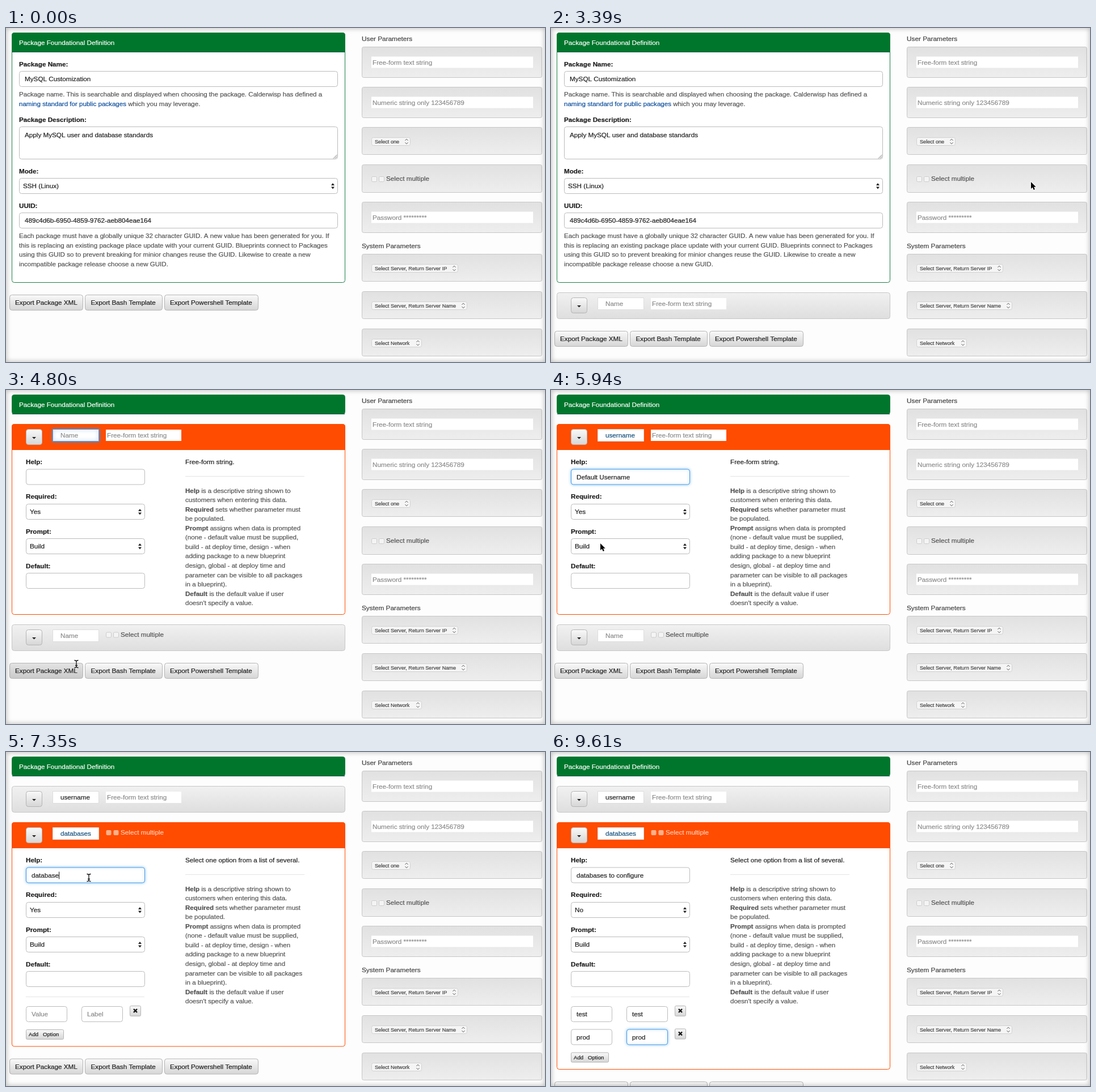
An HTML page with a canvas that plays this animation: 950 px wide and 590 px high, repeating every 9.71 s.

```html
<!DOCTYPE html>
<html lang="en">
<head>
<meta charset="utf-8">
<title>Package builder</title>
<style>
  html, body { margin: 0; width: 100%; height: 100%; overflow: hidden; background: #fdfdfd; }
  canvas { display: block; width: 100vw; height: 100vh; }
</style>
</head>
<body>
<canvas id="stage" width="950" height="590"></canvas>
<script>
const LOOP = 9710, TICK = 141.3;
const GREEN = '#00762c', GREEN_EDGE = '#1a8046', ORANGE = '#ff4c00';
const GREY = '#555', HINT = '#8c8c8c', INK = '#222';
const UI = 11.7, BODY = 11.57; // font sizes
const c = document.getElementById('stage').getContext('2d');
let k = 0;
let focus = '';   // id of the focused field
let mouse = null;

// Pointer stops: tick, x, y
const path = [
  [1, 330, 350], [3, 300, 278], [4, 320, 270], [8, 829, 72], [9, 829, 72], [10, 800, 76],
  [11, 670, 134], [12, 470, 290], [13, 330, 440], [14, 300, 484], [17, 310, 470], [22, 831, 262],
  [23, 831, 262], [24, 846, 272], [25, 861, 268], [26, 780, 300], [27, 560, 420], [28, 330, 510],
  [29, 260, 548], [31, 124, 484], [36, 124, 484], [39, 130, 155], [41, 120, 170], [42, 87, 271],
  [43, 92, 310], [44, 123, 434], [48, 123, 434], [50, 146, 222], [55, 146, 222], [57, 120, 278],
  [58, 110, 290], [59, 72, 463], [61, 80, 466], [62, 68, 498], [63, 72, 503], [65, 174, 508], [67, 174, 508]
];
const beams = [[31, 41], [44, 55], [59, 61], [63, 67]];
const focusAt = [
  [0, ''], [3, 'mode'], [14, ''], [32, 'name0'], [39, 'help0'], [45, 'name1'], [50, 'help1'],
  [57, 'req1'], [59, 'value0'], [60, 'label0'], [63, 'value1'], [64, 'label1']
];

const within = (a, b) => k >= a && k <= b;
const ease = u => { u = Math.min(1, Math.max(0, u)); return u * u * (3 - 2 * u); };

function pointer(t) {
  const i = path.findIndex(p => p[0] >= t);
  if (i < 0 || t < path[0][0]) return null;
  const b = path[i], a = path[i - 1] || b, u = b === a ? 0 : (t - a[0]) / (b[0] - a[0]);
  return { x: a[1] + (b[1] - a[1]) * u, y: a[2] + (b[2] - a[2]) * u };
}

// Typed text so far; busy while the last letter is missing
function typed(s, start, rate) {
  const n = Math.max(0, Math.floor((k - start) * rate));
  return { s: s.slice(0, n), busy: n > 0 && n < s.length };
}

// A hairline stroke gives the letters a slightly fuller weight
function text(s, x, y, color = GREY, size = UI, bold = false) {
  c.font = `${bold ? 'bold ' : ''}${size}px "Liberation Sans", Arial, sans-serif`;
  c.fillStyle = c.strokeStyle = color;
  c.lineWidth = 0.22;
  c.fillText(s, x, y + size * 0.35);
  c.strokeText(s, x, y + size * 0.35);
  return c.measureText(s).width;
}
const label = (s, x, y) => text(s, x, y, INK, UI, true);

function fade(y, h, top, bottom) {
  const g = c.createLinearGradient(0, y, 0, y + h);
  g.addColorStop(0, top);
  g.addColorStop(1, bottom);
  return g;
}

function box(x, y, w, h, fill, stroke, r = 4) {
  c.beginPath();
  c.roundRect(x + 0.5, y + 0.5, w - 1, h - 1, r);
  c.fillStyle = fill;
  c.fill();
  if (stroke) { c.strokeStyle = stroke; c.lineWidth = 1; c.stroke(); }
}

function rule(x, y, w) {
  c.fillStyle = '#e4e4e4';
  c.fillRect(x, y, w, 1);
}

function tri(x, y, w, h) {
  c.beginPath();
  c.moveTo(x - w, y);
  c.lineTo(x + w, y);
  c.lineTo(x, y + h);
  c.fillStyle = '#222';
  c.fill();
}

function frame(id, x, y, w, h) {
  const on = id && id === focus;
  c.save();
  if (on) { c.shadowColor = 'rgba(82,168,236,.6)'; c.shadowBlur = 5; }
  box(x, y, w, h, '#fff', on ? '#4a9be6' : '#bbb');
  c.restore();
}

function field(id, x, y, w, value = { s: '' }, hint = '') {
  frame(id, x, y, w, 28);
  const end = x + 10 + text(value.s || hint, x + 10, y + 14, value.s ? INK : HINT);
  if (value.busy && focus === id) { c.fillStyle = '#111'; c.fillRect(end, y + 8, 1, 13); }
}

function select(id, x, y, w, value) {
  frame(id, x, y, w, 28);
  text(value, x + 7, y + 14, INK);
  tri(x + w - 9, y + 13, 3, -4);
  tri(x + w - 9, y + 15.5, 3, 4);
}

function button(s, x, y, w, h, pad = 10, size = UI) {
  const hot = h > 20 && mouse && mouse.x > x && mouse.x < x + w && mouse.y > y && mouse.y < y + h;
  box(x, y, w, h, hot ? fade(y, h, '#e4e4e4', '#c9c9c9') : fade(y, h, '#fafafa', '#d5d5d5'), '#b4b4b4', h > 20 ? 4 : 2);
  text(s, x + pad, y + h / 2, INK, size);
}

function clipped(x, y, w, h, draw) {
  c.save();
  c.beginPath();
  c.rect(x, y, w, h);
  c.clip();
  draw();
  c.restore();
}

function checks(x, y, color, fill) {
  for (const dx of [0, 13]) box(x + dx, y - 4, 10, 10, fill, fill === '#f4f4f4' ? '#ccc' : null, 2);
  text('Select multiple', x + 26, y, color);
}

function plain(s, x, y, w) {
  c.fillStyle = '#fff';
  c.fillRect(x, y - 10, w, 20);
  text(s, x + 2, y, HINT);
}

function well(y, h, x = 627, w = 318) {
  box(x, y, w, h, fade(y, h, '#e1e1e1', '#eeeeee'), '#c6c6c6', 3);
}

function pill(s, y, w) {
  well(y, 49);
  box(644, y + 18, w, 15, '#f5f5f5', '#d2d2d2', 3);
  text(s, 650, y + 25.5, '#444', 9.15);
  c.strokeStyle = '#555';
  c.lineWidth = 1;
  const x = 644 + w - 7;
  for (const d of [-1, 1]) {
    c.beginPath();
    c.moveTo(x - 2.5, y + 25.5 + d * 1.7);
    c.lineTo(x, y + 25.5 + d * 4.3);
    c.lineTo(x + 2.5, y + 25.5 + d * 1.7);
    c.stroke();
  }
}

function sidebar() {
  text('User Parameters', 627, 19, '#444', 11.8);
  [['Free-form text string', 33], ['Numeric string only 123456789', 104], ['Password *********', 307]]
    .forEach(([s, y]) => { well(y, 55); plain(s, 644, y + 27.5, 285); });
  pill('Select one', 175, 69);
  well(241, 50);
  checks(644, 266, GREY, '#f4f4f4');
  text('System Parameters', 627, 385, '#444', 11.8);
  pill('Select Server, Return Server IP', 399, 153);
  pill('Select Server, Return Server Name', 465, 169);
  pill('Select Network', 531, 89);
}

function foundation(open) {
  const h = 35 + 407 * open;
  if (open > 0) box(10, 8, 588, h, '#fff', GREEN_EDGE);
  box(10, 8, 588, 35, GREEN, GREEN_EDGE, open > 0 ? [4, 4, 0, 0] : 4);
  c.fillStyle = '#0a5c5c';
  c.fillRect(11, 42, 586, 1);
  text('Package Foundational Definition', 23, 26, '#fff');
  if (!open) return 8 + h;
  clipped(10, 43, 588, h - 36, () => {
    label('Package Name:', 23, 63.5);
    field('', 23, 76, 562, { s: 'MySQL Customization' });
    text('Package name. This is searchable and displayed when choosing the package. Calderwisp has defined a', 23, 117, GREY, BODY);
    const w = text('naming standard for public packages', 23, 133.5, '#0a4d9c', BODY);
    text(' which you may leverage.', 23 + w, 133.5, GREY, BODY);
    label('Package Description:', 23, 162);
    frame('', 23, 174, 562, 58);
    text('Apply MySQL user and database standards', 33, 188.5, INK);
    c.strokeStyle = '#777';
    c.lineWidth = 1;
    for (const d of [3, 6]) {
      c.beginPath();
      c.moveTo(583 - d, 230.5);
      c.lineTo(583.5, 230 - d);
      c.stroke();
    }
    label('Mode:', 23, 253);
    select('mode', 23, 265, 562, 'SSH (Linux)');
    label('UUID:', 23, 314);
    field('', 23, 326, 562, { s: '489c4d6b-6950-4859-9762-aeb804eae164' });
    ['Each package must have a globally unique 32 character GUID. A new value has been generated for you. If',
     'this is replacing an existing package place update with your current GUID. Blueprints connect to Packages',
     'using this GUID so to prevent breaking for minior changes reuse the GUID. Likewise to create a new',
     'incompatible package release choose a new GUID.'].forEach((s, i) => text(s, 23, 367 + i * 16.53, GREY, BODY));
  });
  return 8 + h;
}

const notes = [
  '*Help* is a descriptive string shown to', 'customers when entering this data.',
  '*Required* sets whether parameter must', 'be populated.',
  '*Prompt* assigns when data is prompted', '(none - default value must be supplied,',
  'build - at deploy time, design - when', 'adding package to a new blueprint',
  'design, global - at deploy time and', 'parameter can be visible to all packages',
  'in a blueprint).', '*Default* is the default value if user', "doesn't specify a value."
];

function options(y, rows) {
  rule(35, y + 308, 209);
  rows.forEach(([value, name], i) => {
    const top = y + 325 + i * 40.5;
    field('value' + i, 35, top, 73, value, 'Value');
    field('label' + i, 133, top, 73, name, 'Label');
    button('', 218, top - 1, 20, 19);
    c.strokeStyle = '#111';
    c.lineWidth = 2.4;
    c.beginPath();
    for (const d of [-3, 3]) { c.moveTo(228 - d, top + 5); c.lineTo(228 + d, top + 11); }
    c.stroke();
  });
  button('Add   Option', 35, y + 325.5 + rows.length * 40.5, 67, 18, 5, 9.6);
}

function param(i, y, open, active, name, help, rows) {
  const full = rows.length ? 356 + rows.length * 40.5 : 337;
  const h = 47 + (full - 47) * open;
  if (open > 0) box(10, y, 588, h, '#fff', active ? ORANGE : '#c6c6c6');
  if (active) box(10, y, 588, 46, ORANGE, ORANGE, [4, 4, 0, 0]);
  else box(10, y, 588, 47, fade(y, 47, '#f1f1f1', '#dedede'), '#c6c6c6');

  button('', 35, y + 9, 29, 28);
  tri(49.5, y + 23, 3.5, 3.5);
  c.save();
  if (focus === 'name' + i) { c.shadowColor = '#3b8fe0'; c.shadowBlur = 6; }
  box(82, y + 9, 82, 22, '#fff', focus === 'name' + i ? '#5aa2e6' : '#ddd', 0);
  c.restore();
  const end = 96 + text(name.s || 'Name', 96, y + 20, !name.s ? HINT : active ? '#14507c' : INK);
  if (name.busy) { c.fillStyle = '#111'; c.fillRect(end, y + 13, 1, 13); }
  if (i) checks(176, y + 17.5, active ? '#ffcdb6' : GREY, active ? '#ffb08a' : '#f4f4f4');
  else plain('Free-form text string', 176, y + 20, 133);

  if (open > 0) clipped(10, y + 47, 588, h - 48, () => {
    label('Help:', 35, y + 67.3);
    field('help' + i, 35, y + 79.5, 210, help);
    label('Required:', 35, y + 128.3);
    select('req' + i, 35, y + 141, 210, i && k >= 58 ? 'No' : 'Yes');
    label('Prompt:', 35, y + 189.6);
    select('', 35, y + 202, 210, 'Build');
    label('Default:', 35, y + 250.7);
    field('', 35, y + 263, 210);
    text(i ? 'Select one option from a list of several.' : 'Free-form string.', 316, y + 67.3, INK);
    rule(316, y + 92, 210);
    notes.forEach((line, n) => {
      let x = 316;
      line.split('*').forEach((s, part) => { x += text(s, x, y + 117.7 + n * 16.53, GREY, BODY, part === 1); });
    });
    if (rows.length) options(y, rows);
  });
  return y + h;
}

function dragged() {
  const p = pointer(k - 0.47);
  if (within(10, 13)) {
    const x = p.x - 202, y = p.y - 39.5;
    well(y, 55, x, 166);
    plain('Free-form text string', x + 17, y + 27, 132);
  } else if (within(26, 28)) {
    const x = p.x - 234, y = p.y - 27;
    well(y, 50, x, 138);
    checks(x + 17, y + 25, GREY, '#f4f4f4');
  }
}

function drawPointer() {
  if (!mouse) return;
  c.save();
  c.translate(mouse.x, mouse.y);
  c.beginPath();
  if (beams.some(b => within(...b))) {
    for (const d of [-1, 1]) {
      c.moveTo(-3.5, d * 6.5);
      c.quadraticCurveTo(0, d * 6.5, 0, d * 4);
      c.quadraticCurveTo(0, d * 6.5, 3.5, d * 6.5);
    }
    c.moveTo(0, -5);
    c.lineTo(0, 5);
    c.moveTo(-2, 2.5);
    c.lineTo(2, 2.5);
    c.strokeStyle = '#111';
    c.lineWidth = 1.3;
    c.stroke();
  } else {
    [[0, 0], [0, 12], [2.8, 9.5], [4.8, 14], [6.9, 13], [5, 8.8], [8.7, 8.7]].forEach(p => c.lineTo(...p));
    c.closePath();
    c.strokeStyle = '#fff';
    c.lineWidth = 1.6;
    c.stroke();
    c.fillStyle = '#000';
    c.fill();
  }
  c.restore();
}

function edgeShade() {
  c.save();
  c.shadowColor = 'rgba(0,0,0,.4)';
  c.shadowBlur = 9;
  c.strokeStyle = '#aaa';
  c.lineWidth = 4;
  c.strokeRect(-2, -2, 954, 594);
  c.restore();
}

function draw() {
  focus = focusAt.filter(f => f[0] <= k).pop()[1];
  mouse = pointer(k);
  c.fillStyle = '#fdfdfd';
  c.fillRect(0, 0, 950, 590);
  sidebar();

  const first = ease((k - 31) / 3), second = ease((k - 44) / 3);
  let y = foundation(1 - first);
  if (k === 13) y += 64;
  if (k >= 14) y = param(0, y + 17, first - second, within(32, 44),
    typed('username', 34, 2), typed('Default Username', 39, 5.4), []);
  if (k === 28) y += 64;
  if (k >= 29) {
    const rows = [[typed('test', 58, 2), typed('test', 60, 4)]];
    if (k >= 63) rows.push([typed('prod', 63, 4), typed('prod', 64, 2)]);
    y = param(1, y + 17, second, k >= 45, typed('databases', 47, 4.5), typed('databases to configure', 50, 4), rows);
  }
  button('Export Package XML', 6, y + 21, 130, 28);
  button('Export Bash Template', 139, y + 21, 137, 28, 10.5);
  button('Export Powershell Template', 279, y + 21, 166, 28);
  dragged();
  edgeShade();
  drawPointer();
}

const start = performance.now();
function loop() {
  k = Math.floor(((performance.now() - start) % LOOP + 4) / TICK);
  draw();
  requestAnimationFrame(loop);
}
loop();
</script>
</body>
</html>
```
